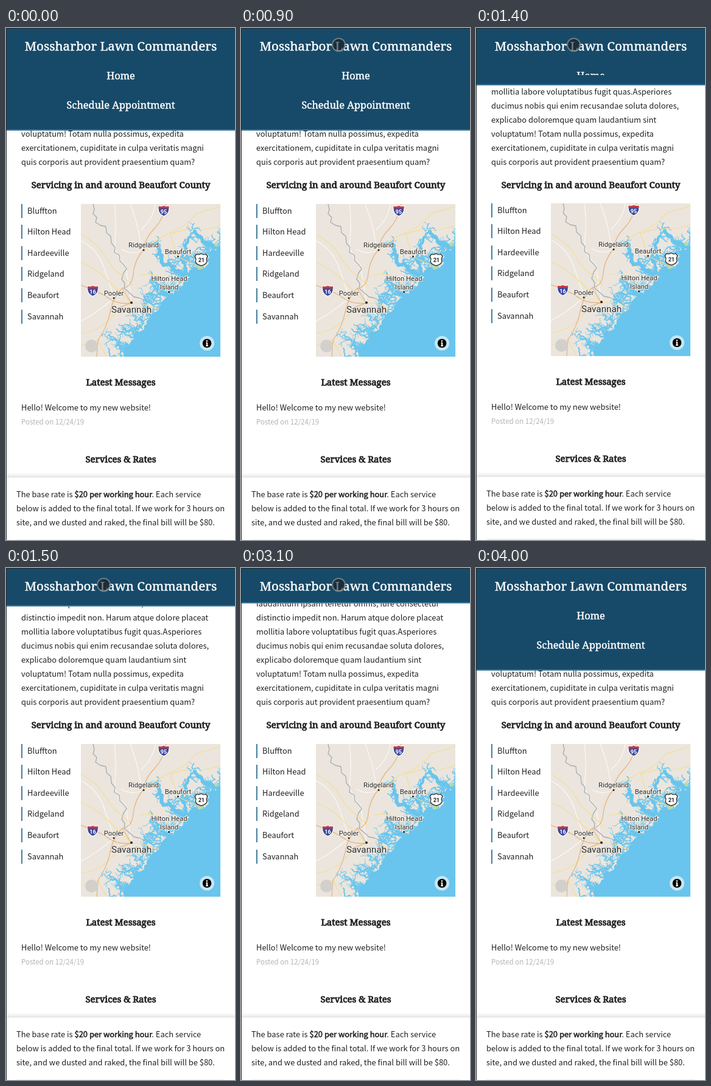
These frames come from a looping animation (376 px wide and 838 px high, 4100 ms). An HTML page:

```html
<!DOCTYPE html>
<html lang="en">
<head>
<meta charset="utf-8">
<title>Lawn care site</title>
<style>
@property --open { syntax: '<length>'; inherits: true; initial-value: 110px; }
html, body { margin: 0; width: 100%; height: 100%; overflow: hidden; background: #fff; }
#stage { position: relative; width: 376px; height: 838px; overflow: hidden; background: #fff; --loop: 4100ms; }
#stage > *, header > * { position: absolute; left: 0; }
svg { display: block; }
text { white-space: pre; }
.body { font: 12.9px "Noto Sans CJK JP", "Noto Sans CJK SC", "Noto Sans CJK", "Noto Sans", sans-serif; fill: #222; }
.strong { stroke: #222; stroke-width: .55; }
.note { font-size: 11.5px; fill: #b4b4b4; }
.slab { font-family: "Noto Serif", serif; text-anchor: middle; }
.head { font-size: 15px; fill: #222; stroke: #222; stroke-width: .9; }
.light { fill: #fff; stroke: #fff; stroke-width: .45; }

/* map */
.water { fill: #69c5ed; }
.creek, .road { fill: none; stroke-linejoin: round; stroke-linecap: round; }
.creek { stroke: #69c5ed; }
.minor { stroke: #fbf8f3; stroke-width: 1.2; }
.major { stroke: #f6dc8c; stroke-width: 1.1; }
.inter { stroke: #e8b07a; stroke-width: 1.2; }
.river { stroke: #a3adb5; stroke-width: 1.3; }
.label { font: 11.3px Roboto, sans-serif; text-anchor: middle; fill: #2b2b2b; stroke: #f4f0ea; stroke-width: 2px; stroke-linejoin: round; paint-order: stroke; }
.city { font-size: 15.2px; }
.sign { font: bold 9px Roboto, sans-serif; text-anchor: middle; }

/* header */
header { top: 0; width: 376px; height: calc(56px + var(--open)); background: #174a69; border-bottom: 2px solid #3f7a9c; animation: menu var(--loop) linear infinite; }
nav { top: 41px; width: 376px; height: var(--open); overflow: hidden; }
nav svg { margin-top: -41px; }
#tap { left: 31px; top: 17px; width: 315px; height: 24px; background: rgba(51, 181, 229, .42); animation: tap var(--loop) step-end infinite; }
#stage > #touch { left: 149px; top: 16px; width: 19px; height: 19px; border: 2px solid rgba(150, 156, 160, .7); border-radius: 50%; background: rgba(24, 26, 30, .58); animation: touch var(--loop) infinite; }
#edge { top: 0; width: 376px; height: 838px; box-shadow: inset 1px 1px #24282c; }
#lower { animation: nudge var(--loop) step-end infinite; }

@keyframes menu {
  0%, 31.5% { --open: 110px; }
  34.15% { --open: 36px; }
  36.59% { --open: 5px; }
  38.5%, 76.2% { --open: 0px; }
  77.9%, 100% { --open: 110px; }
}
@keyframes tap {
  0%, 33.9%, 81%, 100% { opacity: 0; }
  31.6%, 77.8% { opacity: 1; }
}
@keyframes touch {
  0%, 12% { transform: translateY(-42px); animation-timing-function: ease-out; }
  21.5%, 90.2% { transform: none; animation-timing-function: step-end; }
  90.3%, 100% { transform: translateY(-42px); }
}
@keyframes nudge {
  0%, 36.5%, 100% { transform: none; }
  33.9% { transform: translateY(-1px); }
}
</style>
</head>
<body>
<div id="stage">
  <svg width="376" height="838" style="top:0">
    <defs>
      <linearGradient id="shade" x2="0" y2="1">
        <stop offset="0" stop-opacity="0"/>
        <stop offset="1" stop-opacity=".1"/>
      </linearGradient>
      <g id="shield">
        <path d="M-8-8Q-4-6.500 0-8.500Q4-6.500 8-8Q11.500 4 0 9Q-11.500 4-8-8Z" fill="#39479c" stroke="#fff" stroke-width="1.200"/>
        <path d="M-8-7.500Q-4-6 0-8Q4-6 8-7.500L9-3.800H-9Z" fill="#c8393f"/>
      </g>
    </defs>
    <g id="copy" class="body"></g>
    <text class="slab head" x="188.500" y="262">Servicing in and around Beaufort County</text>

    <g id="lower">
      <g id="towns" class="body"></g>
      <svg x="123" y="288" width="229" height="250" viewBox="123 288 229 250">
        <path fill="#ebe5dd" d="M123 288h229v250H123z"/>
        <g class="road minor">
          <path d="M178 288Q182 320 179 345T196 388L206 448M204 288Q216 320 219 340T226 364M123 348Q150 362 160 390T177 440M226 364Q204 372 190 362M245 288Q242 312 222 330M123 480Q150 466 177 442"/>
        </g>
        <g id="creeks"></g>
        <path class="road river" d="M143 288l2 9-2 7 6 6-2 8 8 5 9 2 1 10 7 6 1 11 6 7-1 8 8 5 1 9 7 7 4 6-5 7-3 10 5 7-1 8 7 6 9 8 9 2 10 4"/>
        <g class="road major">
          <path d="M123 338Q150 352 163 374T188 403L207 420M226 364Q246 345 272 334T312 304L352 292M123 384Q145 392 164 410T203 448M352 323Q326 332 312 330T270 337L282 374M123 500Q156 494 171 476T206 450M282 374L302 384 321 391M123 520L151 511 165 538M218 405Q246 398 262 415L268 432M206 450Q230 450 246 460"/>
        </g>
        <g class="road inter">
          <path d="M263 288Q258 314 243 329T226 362Q211 380 209 402T191 426Q176 440 171 465T151 511L149 538M123 421Q153 431 168 442T206 450M171 465Q185 457 206 450M191 426Q199 440 206 450"/>
        </g>
        <path d="M314 391l8-4 2 6-7 3zM341 353l6-2 2 5-5 2z" fill="#b9dba2"/>
        <g fill="#222">
          <circle cx="226" cy="363.500" r="1.500"/>
          <circle cx="282.500" cy="374" r="1.500"/>
          <circle cx="177" cy="442" r="1.500"/>
          <circle cx="267.500" cy="432" r="1.500"/>
          <circle cx="206" cy="449.500" r="2"/>
        </g>
        <g class="label">
          <text x="226" y="359">Ridgeland</text>
          <text x="282.500" y="369.500">Beaufort</text>
          <text x="177" y="437.500">Pooler</text>
          <text x="268" y="414">Hilton Head</text>
          <text x="268" y="427.500">Island</text>
          <text class="city" x="206" y="466">Savannah</text>
        </g>
        <g class="sign" fill="#fff">
          <use href="#shield" x="259" y="299"/>
          <text x="259" y="304">95</text>
          <use href="#shield" x="142.500" y="430"/>
          <text x="142.500" y="435">16</text>
        </g>
        <path d="M313 370q4 2 7.500-1 3.500 3 7.500 1l3 4q-3 4-1 8-1 5-9.500 7-8.500-2-9.500-7 2-4-1-8z" fill="#fff" stroke="#333" stroke-width="1.300"/>
        <text class="sign" x="320.800" y="382.500" fill="#222">21</text>
        <circle cx="140.500" cy="520.500" r="10.500" fill="#d3d0cc"/>
        <circle cx="330" cy="516" r="12" fill="#c5e6f5"/>
        <circle cx="330" cy="516" r="7.300"/>
        <path d="M328.300 514.500h2.700v5h1v1.500h-4v-1.500h1V516h-.7z" fill="#fff"/>
        <circle cx="329.900" cy="512.300" r="1.200" fill="#fff"/>
      </svg>

      <text class="slab head" x="188.500" y="585">Latest Messages</text>
      <text class="body" x="25" y="626">Hello! Welcome to my new website!</text>
      <text class="body note" x="25" y="649">Posted on 12/24/19</text>
      <text class="slab head" x="188.500" y="711">Services &amp; Rates</text>
      <path d="M0 728h376v8H0z" fill="url(#shade)"/>
      <path d="M0 736h376v104H0z" fill="#fff"/>
      <g class="body">
        <text x="17" y="768">The base rate is <tspan class="strong">$20 per working hour</tspan>. Each service</text>
        <text x="17" y="791">below is added to the final total. If we work for 3 hours on</text>
        <text x="17" y="814">site, and we dusted and raked, the final bill will be $80.</text>
      </g>
      <path d="M17 837h342v2H17z" fill="#ececec"/>
    </g>
  </svg>

  <header>
    <svg width="376" height="56">
      <text class="slab light" x="188.500" y="37" font-size="20.600">Mossharbor Lawn Commanders</text>
    </svg>
    <nav>
      <svg class="slab light" width="376" height="160" font-size="16.400">
        <text x="188.500" y="84">Home</text>
        <text x="188.500" y="132">Schedule Appointment</text>
      </svg>
    </nav>
    <div id="tap"></div>
  </header>
  <div id="touch"></div>
  <div id="edge"></div>
</div>

<script>
const NS = 'http://www.w3.org/2000/svg';
const $ = id => document.getElementById(id);
function add(parent, tag, attrs, content = '') {
  const el = document.createElementNS(NS, tag);
  for (const k in attrs) el.setAttribute(k, attrs[k]);
  el.textContent = content;
  parent.append(el);
}

[
  'laudantium ipsam tenetur omnis, iure consectetur',
  'distinctio impedit non. Harum atque dolore placeat',
  'mollitia labore voluptatibus fugit quas.Asperiores',
  'ducimus nobis qui enim recusandae soluta dolores,',
  'explicabo doloremque quam laudantium sint',
  'voluptatum! Totam nulla possimus, expedita',
  'exercitationem, cupiditate in culpa veritatis magni',
  'quis corporis aut provident praesentium quam?'
].forEach((line, i) => add($('copy'), 'text', { x: 25, y: 63 + 23 * i }, line));

['Bluffton', 'Hilton Head', 'Hardeeville', 'Ridgeland', 'Beaufort', 'Savannah'].forEach((town, i) => {
  const y = Math.round(34.56 * i - .2);
  add($('towns'), 'rect', { x: 25, y: 288 + y, width: 2, height: 23, fill: '#437f9f' });
  add($('towns'), 'text', { x: 35, y: 304 + y }, town);
});

// Ragged shoreline and tidal creeks
let seed = 4127;
const rnd = () => (seed = seed * 16807 % 2147483647) / 2147483647;
const jit = n => (rnd() - .5) * n;
const pt = p => p.map(v => v.toFixed(1)).join(' ');

function rough(a, b, depth) {
  if (!depth) return [b];
  const span = Math.hypot(b[0] - a[0], b[1] - a[1]) * .6;
  const mid = [(a[0] + b[0]) / 2 + jit(span), (a[1] + b[1]) / 2 + jit(span)];
  return [...rough(a, mid, depth - 1), ...rough(mid, b, depth - 1)];
}
const ragged = pts => pts.slice(1).reduce((out, p, i) => out.concat(rough(pts[i], p, 3)), [pts[0]]);

function creek(x, y, dir, len, width) {
  const path = [[x, y]];
  let turn = dir;
  for (let s = 0; s < len; s += 2.5) {
    turn = dir + (turn - dir) * .5 + jit(3);
    x += 2.5 * Math.cos(turn);
    y += 2.5 * Math.sin(turn);
    path.push([x, y]);
    if (width > 1 && rnd() < .2) creek(x, y, dir + jit(3), len * .4, width * .55);
  }
  add($('creeks'), 'path', { class: 'creek', 'stroke-width': width.toFixed(1), d: 'M' + path.map(pt).join('L') });
}

const coast = [[352, 358], [338, 363], [331, 377], [320, 393], [300, 399], [297, 411], [287, 425], [273, 438], [254, 450],
  [248, 464], [238, 472], [227, 488], [214, 496], [211, 510], [199, 522], [193, 538]];
const sounds = [
  [[300, 404], [283, 397], [268, 386], [256, 372], [246, 353]],
  [[298, 402], [294, 388], [288, 376], [296, 362], [302, 342]],
  [[350, 360], [336, 352], [322, 346], [310, 332]],
  [[270, 440], [258, 432], [250, 421], [238, 414]]
];

add($('creeks'), 'path', { class: 'water', d: 'M' + ragged(coast).map(pt).join('L') + 'L352 538Z' });
sounds.forEach((line, i) => {
  add($('creeks'), 'path', { class: 'creek', 'stroke-width': [6, 4, 5.5, 3.5][i], d: 'M' + ragged(line).map(pt).join('L') });
  line.forEach(p => {
    for (let k = 0; k < 3; k++) creek(...p, -1.6 + jit(4), 10 + 14 * rnd(), 1.5);
  });
});
coast.forEach(p => {
  for (let k = 0; k < 3; k++) creek(p[0] + jit(10), p[1] + jit(10), -2.4 + jit(1.6), 24 + 26 * rnd(), 1 + 1.2 * rnd());
});
</script>
</body>
</html>
```
